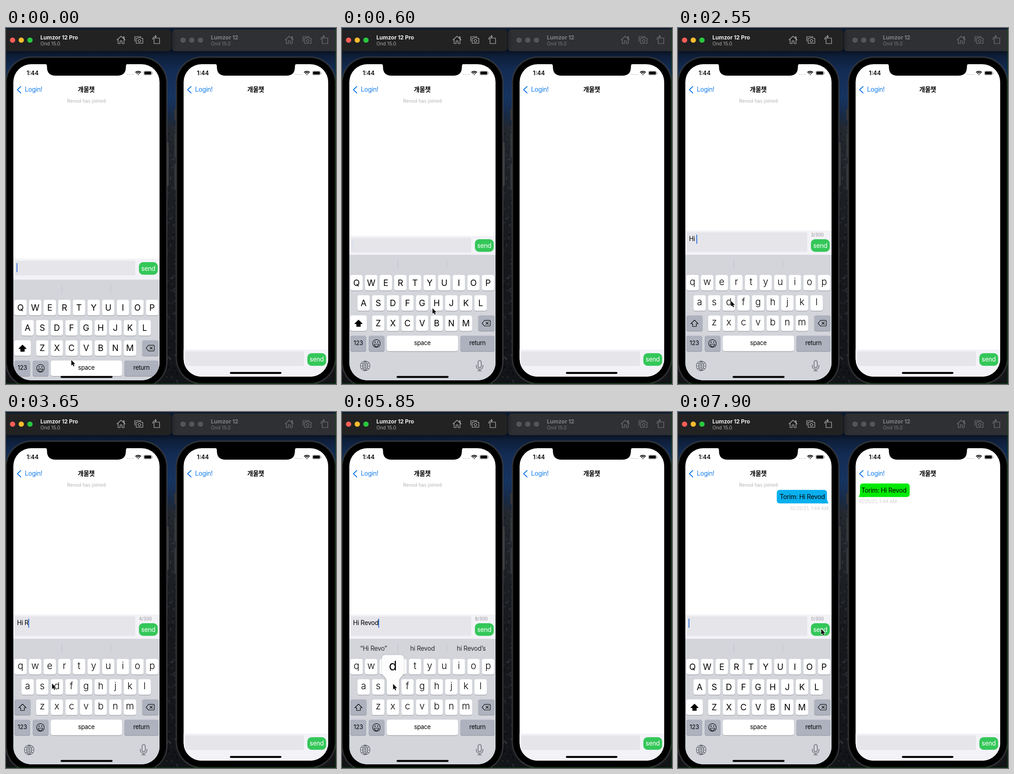
Animation, 720 px wide and 777 px high, one loop 8000 ms. Source, as an HTML page with a canvas:

```html
<!DOCTYPE html>
<html lang="en">
<head>
<meta charset="utf-8">
<title>Chat between two phones</title>
<style>
html, body { margin: 0; width: 100%; height: 100%; overflow: hidden; background: #000; }
canvas { display: block; width: 100vw; height: 100vh; }
</style>
</head>
<body>
<canvas id="stage" width="720" height="777"></canvas>
<script>
const ctx = document.getElementById('stage').getContext('2d');
const LOOP = 8000;
const FONT = 'Inter, "Noto Sans CJK KR", "Noto Sans CJK", sans-serif';
const NAME = 'Revod', SENDER = 'Torim';
const MESSAGE = 'Hi ' + NAME;
const SENT = 6850;
const ROWS = ['QWERTYUIOP', 'ASDFGHJKL', 'ZXCVBNM'];

// Time and letter of each key press
const PRESSES = [[850, 'H'], [1700, 'i'], [2200, ' '], [3200, 'R'], [3900, 'e'],
  [4550, 'v'], [5250, 'o'], [5800, 'd']];

const POINTER = [[50, 142, 724], [600, 197, 611], [880, 197, 611], [1620, 255, 562],
  [1780, 255, 562], [2150, 185, 686], [2260, 183, 686], [2550, 115, 595], [2740, 38, 643],
  [2840, 38, 643], [3170, 124, 562], [3320, 124, 562], [3650, 100, 592], [3880, 96, 562],
  [4020, 96, 562], [4520, 181, 632], [4700, 183, 632], [5220, 287, 562], [5370, 287, 562],
  [5770, 111, 593], [5940, 111, 593], [6650, 312, 473]];

const HINTS = [
  [0, '', '', ''],
  [950, '“H”', 'He', 'Have'],
  [1800, '“Hi”', 'His', 'Him'],
  [2250, '', '', ''],
  [3990, '“Hi Re”', 'hi Red', 'hi Reporter'],
  [4610, '“Hi Rev”', 'hi Review', 'hi Revenue'],
  [5340, '“Hi Revo”', 'hi ' + NAME, 'hi ' + NAME + '’s'],
  [5900, '“' + MESSAGE + '”', 'hi ' + NAME, 'hi ' + NAME + '’s'],
  [SENT, '', '', '']];

const clamp = v => Math.max(0, Math.min(1, v));
const ramp = (t, start, span) => clamp((t - start) / span);
const smooth = v => v * v * (3 - 2 * v);
const mix = (a, b, v) => a + (b - a) * v;

function box(x, y, w, h, r, fill) {
  ctx.beginPath();
  ctx.roundRect(x, y, w, h, r);
  ctx.fillStyle = fill;
  ctx.fill();
}

function disc(x, y, r, fill) {
  ctx.beginPath();
  ctx.arc(x, y, r, 0, 7);
  ctx.fillStyle = fill;
  ctx.fill();
}

function text(str, x, y, size, fill, { align = 'left', weight = 400, gap = 0 } = {}) {
  ctx.font = `${weight} ${size}px ${FONT}`;
  ctx.letterSpacing = gap + 'px';
  ctx.textAlign = align;
  ctx.fillStyle = fill;
  ctx.fillText(str, x, y);
}

const body = (str, x, y, fill, align) => text(str, x, y, 13.9, fill, { align, gap: -0.35 });

function drawAt(x, y, draw) {
  ctx.save();
  ctx.translate(x, y);
  draw();
  ctx.restore();
}

function line(path, x, y, color, width = 1.2, fill = false) {
  drawAt(x, y, () => {
    ctx.lineWidth = width;
    ctx.strokeStyle = ctx.fillStyle = color;
    ctx.lineJoin = ctx.lineCap = 'round';
    const p = new Path2D(path);
    if (fill) ctx.fill(p);
    ctx.stroke(p);
  });
}

function wallpaper() {
  const g = ctx.createLinearGradient(0, 0, 0, 777);
  [[0, '#0d2340'], [0.065, '#0c1a30'], [0.12, '#132c54'], [0.2, '#16335f'], [0.25, '#182a44'],
    [0.28, '#23272f'], [0.4, '#1f2227'], [0.6, '#17191d'], [1, '#121418']].forEach(s => g.addColorStop(...s));
  ctx.fillStyle = g;
  ctx.fillRect(0, 0, 720, 777);
  let seed = 7;
  const rnd = () => (seed = seed * 16807 % 2147483647) / 2147483647;
  for (let i = 0; i < 220; i++) {
    const light = rnd() > 0.5;
    ctx.beginPath();
    ctx.ellipse(346 + rnd() * 32, 215 + rnd() * 560, 1 + rnd() * 3, 0.8 + rnd() * 2, rnd() * 3, 0, 7);
    ctx.fillStyle = light ? 'rgba(95,100,110,.2)' : 'rgba(5,7,12,.3)';
    ctx.fill();
  }
}

function titleBar(x, w, title, active) {
  ctx.save();
  ctx.shadowColor = 'rgba(0,0,0,.6)';
  ctx.shadowBlur = 14;
  box(x, 3, w, 47.5, 8, active ? '#222223' : '#2f3033');
  ctx.restore();
  ['#ff5f57', '#febc2e', '#28c840'].forEach((c, i) =>
    disc(x + 24.3 + i * 19, 26.5, 5.8, active ? c : '#55565a'));
  const ink = active ? '#b9b9ba' : '#77787b';
  text(title, x + 85, 24.5, 12, active ? '#efefef' : '#808185', { weight: 700 });
  text('Ond 15.0', x + 85, 38, 10.5, active ? '#a9a9aa' : '#77787b');
  const right = x + w;
  line('M-9 0L0-8L9 0M-6.5-1V8H-2V2H2V8H6.5V-1M5-4V-7H7V-2', right - 110, 26, ink);
  line('M-8.5 3V-7H5.5M-5.5-3.5H-2L-.8-5H4.2L5.4-3.5H9V7.5H-5.5Z' +
    'M4.6 2A2.9 2.9 0 1 1 4.6 1.9', right - 71.5, 26, ink);
  line('M-5-4H7V8H-5ZM-8-1Q-8-7.5 0-7.5M-2.5-10L0-7.5L-2.5-5', right - 33, 26, ink);
}

function wifi(x, y) {
  for (const r of [2.2, 5.4, 8.6]) {
    ctx.beginPath();
    if (r < 3) ctx.moveTo(x, y + 5);
    ctx.arc(x, y + 5, r, -Math.PI * 0.75, -Math.PI * 0.25);
    ctx.lineWidth = 2;
    ctx.strokeStyle = ctx.fillStyle = '#000';
    if (r < 3) ctx.fill(); else ctx.stroke();
  }
}

function shell(x, w, h) {
  box(x - 17, 62.5, w + 34, h + 33, 57, '#47484b');
  box(x - 16, 63.5, w + 32, h + 31, 56, '#212224');
  box(x - 14, 65.5, w + 28, h + 27, 54, '#000');
  box(x, 79, w, h, 39, '#fff');
}

// Notch, status bar, navigation bar
function chrome(x, w) {
  const mid = x + w / 2, n = w * 0.27;
  drawAt(mid, 78, () => {
    ctx.beginPath();
    ctx.moveTo(-n - 5, 0);
    ctx.quadraticCurveTo(-n, 0, -n, 6);
    ctx.bezierCurveTo(-n, 20, -n + 6, 26, -n + 19, 26);
    ctx.lineTo(n - 19, 26);
    ctx.bezierCurveTo(n - 6, 26, n, 20, n, 6);
    ctx.quadraticCurveTo(n, 0, n + 5, 0);
    ctx.fillStyle = '#000';
    ctx.fill();
  });
  const right = x + w;
  text('1:44', x + 42, 103, 12.6, '#000', { align: 'center', weight: 600 });
  for (let i = 0; i < 4; i++) disc(right - 70 + i * 4, 101.5, 1.1, '#c4c4c6');
  wifi(right - 46.5, 98);
  ctx.lineWidth = 0.8;
  ctx.strokeStyle = '#8a8a8a';
  ctx.beginPath();
  ctx.roundRect(right - 34.5, 93.8, 17.6, 9, 2.6);
  ctx.stroke();
  box(right - 33.2, 95.1, 15, 6.4, 1.5, '#000');
  box(right - 16.2, 97, 1.2, 3, 0.6, '#8a8a8a');
  line('M4-7L-3.5 0L4 7', x + 12.3, 134.8, '#147be8', 1.9);
  body('Login!', x + 25, 139.4, '#147be8');
  text('개울챗', mid - 0.5, 139, 13.6, '#000', { align: 'center', weight: 600, gap: -0.3 });
}

function sendButton(x, y) {
  box(x, y, 41, 27.4, 9, '#34c759');
  body('send', x + 20.3, y + 18.6, '#fff', 'center');
}

function typed(t) {
  if (t >= SENT) return '';
  return PRESSES.filter(p => t >= p[0]).map(p => p[1]).join('');
}

// The caret restarts its blink on every edit
function caretAlpha(t) {
  const last = [0, ...PRESSES.map(p => p[0]), SENT].findLast(v => v <= t);
  const age = (t - last) % 1050;
  return age < 900 ? 1 - 0.93 * ramp(age, 550, 50) : ramp(age, 900, 130);
}

function inputBar(t, dy) {
  const grow = ramp(t, PRESSES[0][0], 100);
  const top = mix(453.5, 442, grow) + dy;
  ctx.fillStyle = '#f2f2f7';
  ctx.fillRect(16, top, 319, 500 + dy - top);
  const fieldTop = mix(458, 446, grow) + dy;
  box(19.5, fieldTop, 262.5, mix(490, 488.5, grow) + dy - fieldTop, 2, '#e5e5ea');
  sendButton(290, 461 + dy);
  const str = typed(t);
  if (grow > 0) {
    ctx.globalAlpha = grow;
    text(str.length + '/300', 290, 454.8 + dy, 9.8, '#929297');
    ctx.globalAlpha = 1;
  }
  body(str, 24, fieldTop + 19.4, '#000');
  const x = 23 + (str ? ctx.measureText(str).width + 0.5 : 0);
  ctx.globalAlpha = caretAlpha(t);
  box(x, fieldTop + 5, 1.8, 20, 0.8, '#2f6fdc');
  ctx.globalAlpha = 1;
}

function keycap(x, y, w, fill) {
  box(x, y + 1, w, 34, 4.2, '#8d9097');
  box(x, y, w, 34, 4.2, fill);
}

function keyCentre(ch) {
  const row = ROWS.findIndex(r => r.includes(ch.toUpperCase()));
  const col = ROWS[row].indexOf(ch.toUpperCase());
  return [[31.7, 47.2, 79.1][row] + 31.9 * col, 539 + row * 44.2];
}

function popup(ch) {
  const [x, y] = keyCentre(ch);
  drawAt(x, y, () => {
    ctx.save();
    ctx.shadowColor = 'rgba(0,0,0,.28)';
    ctx.shadowBlur = 3;
    ctx.shadowOffsetY = 0.5;
    ctx.beginPath();
    ctx.moveTo(-16, -53);
    ctx.lineTo(16, -53);
    ctx.quadraticCurveTo(24, -53, 24, -45);
    ctx.lineTo(24, -17);
    ctx.bezierCurveTo(24, -6, 13.5, -6, 13.5, 5);
    ctx.lineTo(13.5, 30);
    ctx.quadraticCurveTo(13.5, 34, 9.5, 34);
    ctx.lineTo(-9.5, 34);
    ctx.quadraticCurveTo(-13.5, 34, -13.5, 30);
    ctx.lineTo(-13.5, 5);
    ctx.bezierCurveTo(-13.5, -6, -24, -6, -24, -17);
    ctx.lineTo(-24, -45);
    ctx.quadraticCurveTo(-24, -53, -16, -53);
    ctx.fillStyle = '#fdfdfe';
    ctx.fill();
    ctx.restore();
    text(ch, 0, -19, 28.5, '#000', { align: 'center' });
  });
}

function hints(t) {
  const i = HINTS.findLastIndex(h => t >= h[0]);
  const fade = ramp(t, HINTS[i][0], 90);
  const draw = (set, alpha) => {
    ctx.globalAlpha = alpha;
    set.slice(1).forEach((s, k) => body(s, 69 + k * 106.5, 521, '#2a2b2e', 'center'));
  };
  if (i > 0 && fade < 1) draw(HINTS[i - 1], 1 - fade);
  draw(HINTS[i], fade);
  ctx.globalAlpha = 1;
}

function keyboard(t) {
  const upper = t < 970 || (t >= 2770 && t < 3320) || t >= SENT + 50;
  ctx.fillStyle = '#d3d5db';
  ctx.fillRect(16, 495, 319, 290);
  ctx.fillStyle = '#c0c3c9';
  ctx.fillRect(121.5, 506, 1, 20);
  ctx.fillRect(228, 506, 1, 20);
  hints(t);
  for (const ch of ROWS.join('')) {
    const [x, y] = keyCentre(ch);
    keycap(x - 13.5, y, 27, '#fff');
    if (upper) text(ch, x, y + 23.6, 18.6, '#000', { align: 'center' });
    else text(ch.toLowerCase(), x, y + 21.6, 20.5, '#000', { align: 'center', weight: 300 });
  }
  const grey = '#adb2be';
  keycap(18, 627.3, 36, upper ? '#fff' : grey);
  line('M0-7L8 1H4V7H-4V1H-8Z', 36, 644.5, '#000', 1.2, upper);
  keycap(297, 627.3, 36, grey);
  line('M-9 0L-3.5-6.2H7.5Q9-6.2 9-4.7V4.7Q9 6.2 7.5 6.2H-3.5ZM-.5-2.7L5 2.7M5-2.7L-.5 2.7', 314.5, 644.3, '#111');
  keycap(18, 671.5, 35, grey);
  keycap(58, 671.5, 35, grey);
  keycap(98, 671.5, 155, '#fff');
  keycap(258, 671.5, 75, grey);
  const label = (s, x) => text(s, x, 692, 13.1, '#000', { align: 'center', gap: -0.3 });
  label('123', 35.5);
  label('space', 175.3);
  label('return', 295.5);
  line('M8.3 0A8.3 8.3 0 1 1 8.3-.1M-5 1.5H5A5 5 0 0 1-5 1.5', 75.2, 688.5, '#111');
  disc(72.3, 685.5, 1.2, '#111');
  disc(78.1, 685.5, 1.2, '#111');
  line('M10.5 0A10.5 10.5 0 1 1 10.5-.1M-10.5 0H10.5M0-10.5V10.5M-8.5-6Q0-2 8.5-6M-8.5 6Q0 2 8.5 6' +
    'M0-10.5C-7-5-7 5 0 10.5C7 5 7-5 0-10.5', 50.5, 737.5, '#55585e', 1.1);
  line('M-3.6-7.5A3.6 3.6 0 0 1 3.6-7.5V1A3.6 3.6 0 0 1-3.6 1ZM-7.2-1V1A7.2 7.2 0 0 0 7.2 1V-1M0 8.3V11.3M-4 11.3H4',
    300.3, 737, '#55585e', 1.3);
  const press = PRESSES.find(p => p[1] !== ' ' && t >= p[0] && t < p[0] + 140);
  if (press) popup(press[1]);
}

function messages(t) {
  const alpha = smooth(ramp(t, SENT + 30, 220));
  if (!alpha) return;
  const content = SENDER + ': ' + MESSAGE, stamp = '10/25/21, 1:44 AM';
  const tail = (x, y, dir, color) => line(`M0-10L${4 * dir} 0L${-10 * dir} 0Z`, x, y, color, 0.4, true);
  ctx.globalAlpha = alpha;
  box(215.5, 170, 109.5, 29.5, 6, '#0aafee');
  tail(324, 199.3, 1, '#0aafee');
  body(content, 222, 190, '#000');
  text(stamp, 328.5, 213.5, 10, '#cfcfd1', { align: 'right' });
  box(397, 156, 108.5, 29.5, 6, '#00ea06');
  tail(398.5, 185.3, -1, '#00ea06');
  body(content, 400, 176, '#000');
  text(stamp, 393.5, 199, 10, '#cfcfd1');
  ctx.globalAlpha = 1;
}

function pointer(t) {
  const i = POINTER.findIndex(p => p[0] > t);
  const b = POINTER.at(i), a = i > 0 ? POINTER[i - 1] : b;
  const v = a === b ? 0 : smooth(ramp(t, a[0], b[0] - a[0]));
  drawAt(mix(a[1], b[1], v), mix(a[2], b[2], v), () => {
    const p = new Path2D('M.5 .5V12.8L3.2 10.2L5.2 14.6L7.2 13.7L5.3 9.5H9Z');
    ctx.lineJoin = 'round';
    ctx.lineWidth = 1.6;
    ctx.strokeStyle = '#fff';
    ctx.stroke(p);
    ctx.fillStyle = '#000';
    ctx.fill(p);
  });
}

function leftPhone(t) {
  box(350, 250, 5, 95, 2, '#3c3d40');
  shell(16, 319, 690);
  ctx.save();
  ctx.beginPath();
  ctx.roundRect(16, 79, 319, 690, 39);
  ctx.clip();
  const rise = Math.pow(1 - ramp(t, 0, 420), 3);
  inputBar(t, 50.4 * rise);
  drawAt(0, 54.7 * rise, () => keyboard(t));
  ctx.restore();
  box(119, 759.5, 113.5, 4.2, 2.1, '#000');
  chrome(16, 319);
  text(NAME + ' has joined', 175.3, 163.2, 10.5, '#b4b4b6', { align: 'center' });
}

function rightPhone() {
  [[177, 24], [229, 53], [298, 55]].forEach(([y, h]) => box(367, y, 6, h, 2, '#343538'));
  shell(387.5, 315.5, 682);
  ctx.save();
  ctx.beginPath();
  ctx.roundRect(387.5, 79, 315.5, 682, 39);
  ctx.clip();
  ctx.fillStyle = '#f2f2f7';
  ctx.fillRect(387, 702, 317, 60);
  box(391, 706, 259, 31.5, 2, '#e5e5ea');
  sendButton(657.5, 709.8);
  ctx.restore();
  box(488.5, 750.7, 112.5, 4.2, 2.1, '#000');
  chrome(387.5, 315.5);
}

function render(t) {
  ctx.clearRect(0, 0, 720, 777);
  wallpaper();
  titleBar(362, 366, 'Lumzor 12', false);
  titleBar(-10, 371, 'Lumzor 12 Pro', true);
  leftPhone(t);
  rightPhone();
  messages(t);
  pointer(t);
  ctx.fillStyle = '#0b4a10';
  ctx.fillRect(719, 0, 1, 777);
  ctx.fillRect(0, 776, 720, 1);
}

function tick() {
  render(performance.now() % LOOP);
  requestAnimationFrame(tick);
}
tick();
</script>
</body>
</html>
```
